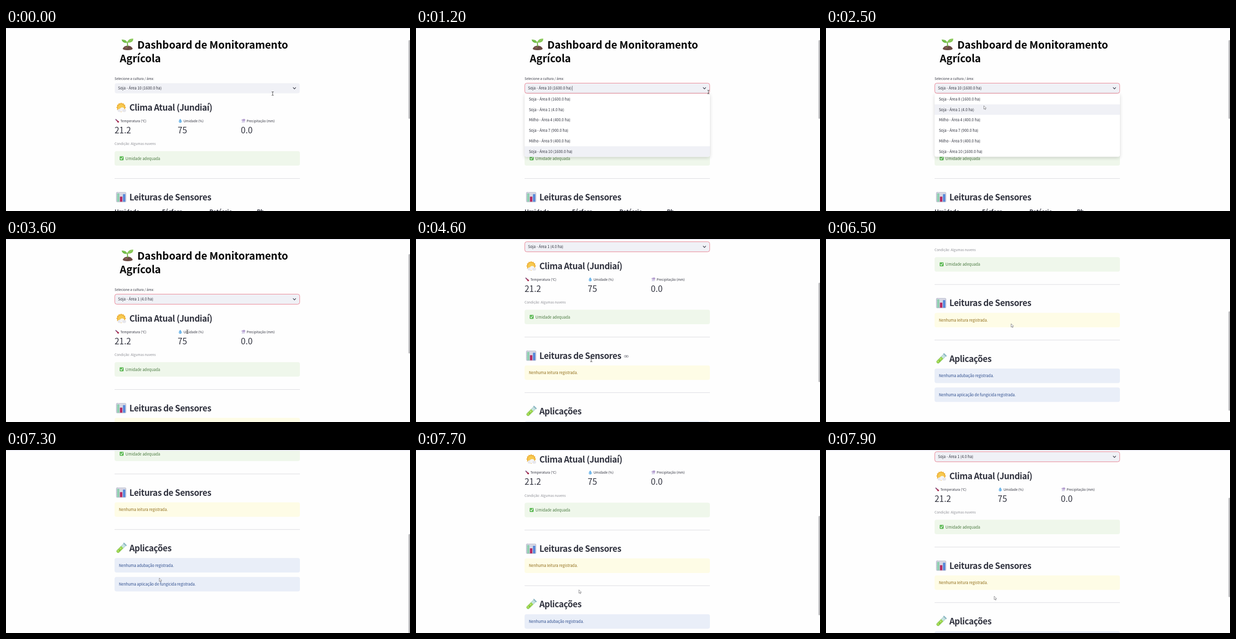
Animation of 800 by 363 pixels, one loop 8000 ms. Source, as an HTML page with a canvas:

```html
<!DOCTYPE html>
<html lang="pt-BR">
<head>
<meta charset="utf-8">
<title>Dashboard</title>
<style>
html, body { margin: 0; width: 100%; height: 100%; overflow: hidden; background: #fefefe; }
canvas { display: block; width: 800px; height: 363px; }
</style>
</head>
<body>
<canvas id="stage"></canvas>
<script>
const W = 800, H = 363, LOOP = 8000, STEP = 100;
const LEFT = 215, WIDTH = 367;
const INK = '#31333f';
const FAMILY = '"Noto Sans CJK JP", "Noto Sans CJK SC", "Noto Sans CJK", "Open Sans", sans-serif';
const GLYPH_SCALE = 1.117; // Latin letters in the CJK family are drawn enlarged
const SIZE = { title: 22.94, heading: 18.77, sub: 12.5, body: 8.34, small: 7.3 };

const FOCUS = 800, OPEN = 900, PICK = 2900, REFRESH = 3300;
const OPTIONS = ['Soja - Área 8 (1600.0 ha)', 'Soja - Área 1 (4.0 ha)', 'Milho - Área 4 (400.0 ha)',
  'Soja - Área 7 (900.0 ha)', 'Milho - Área 9 (400.0 ha)', 'Soja - Área 10 (1600.0 ha)'];
const ROW_TOP = 130.6, ROW = 20.8;

const SCROLL = [[0, 0], [4000, 0], [4450, 104], [4850, 104], [5300, 208.3], [6650, 208.3],
  [6950, 251], [7400, 251], [7800, 119], [7900, 106], [8000, 95]];
const POINTER = [[0, 528, 130], [100, 528, 130], [500, 579, 127], [1650, 579, 127], [2600, 304, 155],
  [2900, 304, 157], [3600, 359, 184], [3800, 359, 184], [4400, 347, 240], [4700, 347, 240],
  [6400, 366.5, 168], [6500, 366.5, 168], [7300, 303.5, 254], [7400, 303.5, 254], [7900, 333, 290]];

const canvas = document.getElementById('stage');
const ctx = canvas.getContext('2d');
const ratio = window.devicePixelRatio || 1;
canvas.width = W * ratio;
canvas.height = H * ratio;

function track(keys, t, i = 1) {
  const n = keys.findIndex(k => k[0] > t);
  if (n < 0) return keys[keys.length - 1][i];
  if (n === 0) return keys[0][i];
  const a = keys[n - 1], b = keys[n];
  const u = (t - a[0]) / (b[0] - a[0]);
  return a[i] + (b[i] - a[i]) * u * u * (3 - 2 * u);
}

function text(str, x, y, size = SIZE.body, color = INK, weight = 400, tracking = 0) {
  ctx.font = `${weight} ${size / GLYPH_SCALE}px ${FAMILY}`;
  ctx.letterSpacing = `${tracking * size}px`;
  ctx.fillStyle = color;
  ctx.fillText(str, x, y);
}

function box(x, y, w, h, r, fill, line) {
  ctx.beginPath();
  ctx.roundRect(x, y, w, h, r);
  if (fill) { ctx.fillStyle = fill; ctx.fill(); }
  if (line) { ctx.strokeStyle = line; ctx.lineWidth = 0.8; ctx.stroke(); }
}

function oval(x, y, rx, ry, fill, angle = 0) {
  ctx.beginPath();
  ctx.ellipse(x, y, rx, ry, angle, 0, Math.PI * 2);
  ctx.fillStyle = fill;
  ctx.fill();
}

function line(points, color, width) {
  ctx.beginPath();
  points.forEach(([x, y]) => ctx.lineTo(x, y));
  ctx.strokeStyle = color;
  ctx.lineWidth = width;
  ctx.lineCap = ctx.lineJoin = 'round';
  ctx.stroke();
}

function shape(path, fill) {
  ctx.fillStyle = fill;
  ctx.fill(new Path2D(path));
}

function at(x, y, draw) {
  ctx.save();
  ctx.translate(x, y);
  draw();
  ctx.restore();
}

// Icons are drawn around their own centre.
const icons = {
  seedling() {
    shape('M-10 9 Q-7 3 0 3 Q7 3 10 9 Q9 12 0 12 Q-9 12 -10 9Z', '#6b4a42');
    oval(-3, 7, 3, 1.3, '#8a655a');
    line([[0, 4], [-0.5, 0], [-0.5, -4]], '#6fae3c', 2);
    shape('M-.5 -3 Q-4 -10 -12 -9 Q-10 -1 -.5 -3Z', '#69b83f');
    shape('M-.5 -3 Q0 -11 11 -11 Q11 -2 -.5 -3Z', '#83c552');
    line([[-10, -8], [-1, -3.5], [9, -9.5]], '#a9d977', 0.7);
  },
  sun() {
    ctx.beginPath();
    for (let i = 0; i < 24; i++) {
      const r = i % 2 ? 8 : 9.6, a = i * Math.PI / 12;
      ctx.lineTo(r * Math.cos(a), r * Math.sin(a) - 0.5);
    }
    ctx.fillStyle = '#eeb23c';
    ctx.fill();
    oval(0, -0.5, 6.4, 6.4, '#f7c94f');
    oval(-3, 5.5, 4, 3.3, '#e9e9ee');
    oval(2, 3.7, 4.6, 4.2, '#f4f4f6');
    oval(6.2, 5.8, 3.6, 3, '#e6e6ec');
  },
  chart() {
    box(-9.5, -9.5, 19, 19, 1.5, '#d8d9e6', '#a9abc0');
    for (let i = -5; i < 9; i += 4.5) line([[-9, i], [9, i]], '#c3c6d8', 0.5);
    box(-8, -7.5, 4.5, 16.5, 0.5, '#8fcfb0');
    box(-2.4, -1, 4.8, 10, 0.5, '#b5285e');
    box(3.6, -6, 4.6, 15, 0.5, '#5487da');
  },
  tube() {
    ctx.rotate(Math.PI / 4);
    box(-3, -10.5, 6, 22, 3, '#c5e2df', '#93bdb9');
    box(-3, -3, 6, 14.5, [0, 0, 3, 3], '#9bd44c');
    box(-4.2, -12, 8.4, 2.4, 1, '#8eb8c4');
    oval(-0.8, 1, 1, 1, '#d6f2a0');
    oval(1, 5, 0.9, 0.9, '#5ea535');
    oval(-0.7, 8, 0.8, 0.8, '#d6f2a0');
  },
  thermometer() {
    line([[-2.5, -2.5], [1.8, 1.8]], '#8d6f94', 2.2);
    line([[-1, -1], [2, 2]], '#b02349', 1.3);
    oval(2.1, 2.1, 1.7, 1.7, '#a32045');
  },
  drop() {
    shape('M0 -4 Q3 -.2 2.8 1.5 A2.8 2.5 0 0 1 -2.8 1.5 Q-3 -.2 0 -4Z', '#69b3e8');
    oval(-0.8, 1.5, 0.8, 1.1, '#b5dcf7');
  },
  rain() {
    oval(-1.3, -1.2, 2.4, 2, '#c9bbdc');
    oval(1.3, -1.5, 2.5, 2.3, '#b49ecf');
    for (let i = -2; i < 3; i += 2) line([[i + 0.5, 1.2], [i - 0.5, 3.3]], '#9b8bc9', 0.8);
  },
  check() {
    box(-4, -4, 8, 8, 1.4, '#5fba57');
    line([[-2.2, 0.2], [-0.7, 2], [2.3, -2.2]], '#ffffff', 1.1);
  },
  link() {
    box(-4.3, -1.8, 4.8, 3.6, 1.8, null, '#85868d');
    box(-0.5, -1.8, 4.8, 3.6, 1.8, null, '#85868d');
    line([[-1.8, 0], [1.8, 0]], '#85868d', 0.8);
  }
};

const icon = (name, x, y) => at(x, y, icons[name]);

function heading(name, str, y) {
  icon(name, 228, y);
  text(str, 244.2, y + 6.2, SIZE.heading, INK, 600, -0.022);
}

function metric(name, label, value, x) {
  icon(name, x + 5, 184);
  text(label, x + 11.4, 186.5, SIZE.small);
  text(value, x, 208.6, SIZE.heading);
}

function alertBox(str, y, fill, color, indent = 8.4) {
  box(LEFT, y, WIDTH, 28.8, 4, fill);
  text(str, LEFT + indent, y + 17.3, SIZE.body, color);
}

function rule(y) {
  ctx.fillStyle = '#dddde1';
  ctx.fillRect(LEFT, y - 0.5, WIDTH, 1);
}

function selectBox(t) {
  const value = OPTIONS[t < PICK ? 5 : 1];
  box(LEFT + 0.4, 109.4, WIDTH - 0.8, 20, 4, '#f0f1f6', t >= FOCUS ? '#e8697b' : null);
  text(value, 221.8, 122.3);
  line([[568.7, 118.2], [571.2, 120.8], [573.7, 118.2]], INK, 1.2);
  const open = t >= OPEN && t < PICK;
  if (open && (t - OPEN) % 1000 < 500) line([[309.6, 115], [309.6, 124]], INK, 0.6);
}

function optionList(x, y) {
  const hovered = y > ROW_TOP && x < LEFT + WIDTH ? Math.floor((y - ROW_TOP) / ROW) : 5;
  const height = ROW * OPTIONS.length;
  ctx.save();
  ctx.shadowColor = 'rgba(0,0,0,.16)';
  ctx.shadowBlur = 7 * ratio;
  ctx.shadowOffsetY = 2 * ratio;
  box(LEFT, ROW_TOP, WIDTH, height, [0, 0, 4, 4], '#ffffff');
  ctx.restore();
  OPTIONS.forEach((label, i) => {
    const top = ROW_TOP + i * ROW;
    if (i === hovered) box(LEFT, top, WIDTH, ROW, i === 5 ? [0, 0, 4, 4] : 0, '#f0f1f6');
    text(label, 223.4, top + 13.2);
  });
}

function page(t, scroll, x, y) {
  icon('seedling', 241, 32);
  text('Dashboard de Monitoramento', 260, 40.7, SIZE.title, '#050505', 700, -0.005);
  text('Agrícola', 225.3, 68.3, SIZE.title, '#050505', 700, -0.005);

  text('Selecione a cultura / área:', LEFT, 103, SIZE.small);
  selectBox(t);

  heading('sun', 'Clima Atual (Jundiaí)', 158);
  metric('thermometer', 'Temperatura (°C)', '21.2', 215);
  metric('drop', 'Umidade (%)', '75', 340);
  metric('rain', 'Precipitação (mm)', '0.0', 465);
  text('Condição: Algumas nuvens', LEFT, 232.4, SIZE.small, '#8b8c93');
  alertBox('Umidade adequada', 244.2, '#eff7eb', '#4a7a40', 21.6);
  icon('check', 229, 258.5);
  rule(298.5);

  heading('chart', 'Leituras de Sensores', 335.5);
  if (y > 200 && Math.abs(y + scroll - 336) < 12) icon('link', 416.5, 336.8);
  if (t < REFRESH) {
    ['Umidade', 'Fósforo', 'Potássio', 'Ph'].forEach((label, i) =>
      text(label, LEFT + i * 93.9, 369, SIZE.sub, INK, 600, -0.01));
    return;
  }
  alertBox('Nenhuma leitura registrada.', 354.7, '#fefce6', '#8f6b16');
  rule(408.7);
  heading('tube', 'Aplicações', 445.8);
  alertBox('Nenhuma adubação registrada.', 465.3, '#e9eef8', '#2b4b8c');
  alertBox('Nenhuma aplicação de fungicida registrada.', 502.8, '#e9eef8', '#2b4b8c');
}

function scrollbar(t) {
  const lagged = track(SCROLL, Math.max(0, t - STEP));
  if (t < REFRESH) box(797, 24, 3.5, 156, 1.5, '#bcbcbe');
  else box(797, 30 + lagged * 0.545, 3.5, 197, 1.5, '#bcbcbe');
}

function ibeam() {
  line([[-1.8, -3.6], [0, -3], [1.8, -3.6]], '#333333', 0.8);
  line([[0, -3], [0, 3]], '#333333', 0.8);
  line([[-1.8, 3.6], [0, 3], [1.8, 3.6]], '#333333', 0.8);
}

function arrow() {
  const path = new Path2D('M0 0 L0 6.8 L1.6 5.4 L2.7 7.8 L3.8 7.3 L2.8 5 L4.9 4.9Z');
  ctx.fillStyle = '#ffffff';
  ctx.fill(path);
  ctx.strokeStyle = '#66666c';
  ctx.lineWidth = 0.7;
  ctx.stroke(path);
}

function render(t) {
  const scroll = track(SCROLL, t);
  const x = track(POINTER, t), y = track(POINTER, t, 2);
  ctx.setTransform(ratio, 0, 0, ratio, 0, 0);
  ctx.fillStyle = '#fefefe';
  ctx.fillRect(0, 0, W, H);
  at(0, -scroll, () => page(t, scroll, x, y));
  if (t >= OPEN && t < PICK) optionList(x, y);
  ctx.fillStyle = '#ececf5';
  ctx.fillRect(0, 0, W, 1.6);
  scrollbar(t);
  const overOptions = t >= 1800 && t < 3000;
  at(x, y, overOptions || t >= 5000 ? arrow : ibeam);
}

function frame(now) {
  render(Math.floor(now % LOOP / STEP) * STEP);
  requestAnimationFrame(frame);
}
requestAnimationFrame(frame);
</script>
</body>
</html>
```
